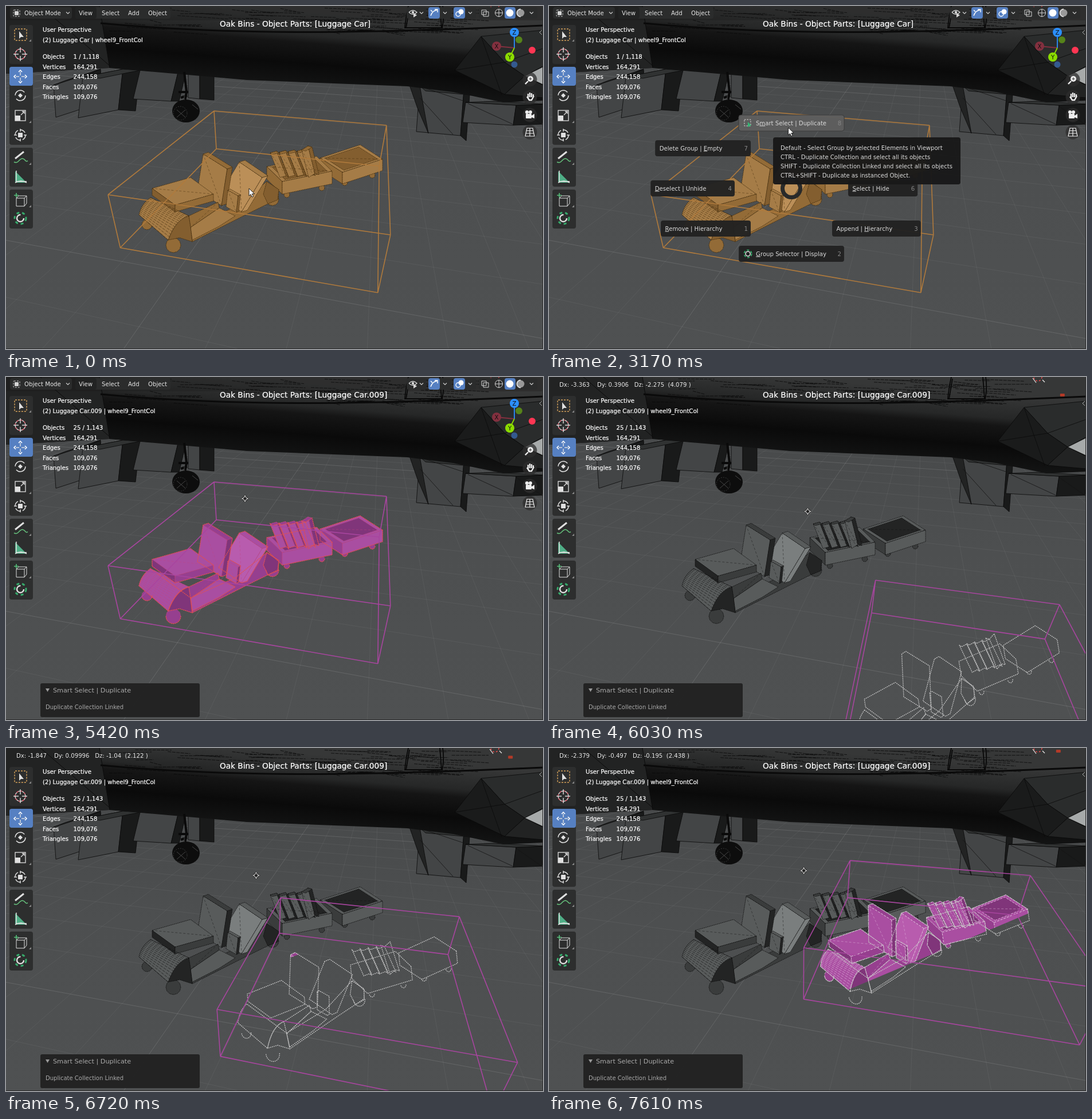
Animation, 937 px wide and 598 px high, one loop 8 s. Source, as an HTML page:

```html
<!DOCTYPE html>
<html lang="en">
<head>
<meta charset="utf-8">
<title>Viewport duplicate</title>
<style>
html, body { margin: 0; width: 100%; height: 100%; overflow: hidden; background: #4d4f50; }
svg { display: block; width: 937px; height: 598px; font: 10.15px "DejaVu Sans", sans-serif; }
text { white-space: pre; }
.overlay { stroke: #fff; stroke-width: .22px; }
.u { text-decoration: underline; }
</style>
</head>
<body>
<svg id="stage" viewBox="0 0 937 598" xmlns="http://www.w3.org/2000/svg"></svg>
<script>
const stage = document.getElementById('stage');
const LOOP = 8000, BLUE = '#5680c2', PINK = '#a8459f', ORANGE = '#b07a3c';

// Markup helpers
const poly = (pts, fill, extra = '') => `<polygon points="${pts}" fill="${fill}" ${extra}/>`;
const path = (d, stroke, width = 1, extra = '') =>
  `<path d="${d}" fill="none" stroke="${stroke}" stroke-width="${width}" ${extra}/>`;
const rect = (x, y, w, h, fill, r = 4, extra = '') =>
  `<rect x="${x}" y="${y}" width="${w}" height="${h}" rx="${r}" fill="${fill}" ${extra}/>`;
const disc = (x, y, r, fill, extra = '') => `<circle cx="${x}" cy="${y}" r="${r}" fill="${fill}" ${extra}/>`;
const ring = (x, y, r, stroke, width = 1.4, dash = 'none') =>
  disc(x, y, r, 'none', `stroke="${stroke}" stroke-width="${width}" stroke-dasharray="${dash}"`);
const text = (x, y, s, fill = '#e6e6e6', extra = '') => `<text x="${x}" y="${y}" fill="${fill}" ${extra}>${s}</text>`;
const overlay = (x, y, s, extra = '') => text(x, y, s, '#fff', `class="overlay" ${extra}`);
const group = (id, body, extra = '') => `<g id="${id}" ${extra}>${body}</g>`;
const chevron = x => path(`M${x - 3} 10.5l3 3l3-3`, '#ccc', 1.2);

// Geometry helpers
const fmt = p => p.map(v => v.toFixed(1)).join();
const line = (a, b) => `M${fmt(a)}L${fmt(b)}`;
const points = s => s.split(' ').map(p => p.split(',').map(Number));
const trace = (pts, move) => pts.map(p => fmt(move(p))).join(' ');
const sum = (...vs) => vs.reduce((a, b) => a.map((v, i) => v + b[i]));
const mix = (a, b, k) => a + (b - a) * k;
const mixPoint = (a, b, k) => a.map((v, i) => mix(v, b[i], k));
const clamp = k => Math.max(0, Math.min(1, k));
const still = p => p;

// Projective frame of the bounding box: homogeneous corner, its three edges, edge lengths in metres
const ORIGIN = [363, 183, 1];
const EDGES = [[239, 5.6, -.0933], [-254.1, 18.3, -.3881], [24, 79.6, .0546]];
const METRES = [-4.37, 3.85, -1.09];
const combine = k => EDGES[0].map((_, i) => k.reduce((s, v, n) => s + v * EDGES[n][i], 0));
const shiftFor = delta => combine(delta.map((v, i) => v / METRES[i]));
const space = (k, shift = [0, 0, 0]) => sum(ORIGIN, shift, combine(k));
const project = (k, shift) => { const [x, y, w] = space(k, shift); return [x / w, y / w]; };

function boxPath(shift) {
  const corner = n => project([n & 1, n >> 1 & 1, n >> 2 & 1], shift);
  let d = '';
  for (let i = 0; i < 8; i++) for (const bit of [1, 2, 4]) if (!(i & bit)) d += line(corner(i), corner(i | bit));
  return d;
}

function floorGrid() {
  let out = '';
  for (let k = -22; k < 22; k++) {
    const x = .285 + k * .229, y = 1.07 - k * .25;
    const endX = Math.min(6, (space([0, y, 1])[2] - .06) / .0933), endY = (space([x, 0, 1])[2] - .06) / .3881;
    const opacity = k % 10 ? .055 : .12;
    if (k > -5) out += path(line(project([-6, y, 1]), project([endX, y, 1])), '#fff', 1, `opacity="${opacity}"`);
    out += path(line(project([x, -5, 1]), project([x, endY, 1])), '#fff', 1, `opacity="${opacity}"`);
  }
  return out;
}

// Car parts: each has toned faces and a rim. A slab shows the three faces that meet at p.
function slab(p, u, v, w, tones) {
  const face = (a, b) => [p, sum(p, a), sum(p, a, b), sum(p, b)];
  return {
    faces: [face(u, v), face(v, w), face(u, w)].map((f, i) => [tones[i], f]),
    rim: [sum(p, u), sum(p, u, v), sum(p, v), sum(p, v, w), sum(p, w), sum(p, w, u)]
  };
}
function tray(p, u, v, w) {
  const part = slab(p, u, v, w, [1, 2, 1]), lid = part.faces[0][1];
  const centre = mixPoint(lid[0], lid[2], .5);
  part.faces.push([3, lid.map(q => mixPoint(centre, q, .84))]);
  return part;
}
const plate = (tone, s) => ({ faces: [[tone, points(s)]], rim: points(s) });
const curve = (a, b, c) => t => mixPoint(mixPoint(a, b, t), mixPoint(b, c, t), t);
const steps = (n, f) => Array.from({ length: n + 1 }, (_, i) => f(i / n));

const hoodLeft = curve([252, 334], [236, 345], [232, 364]);
const hoodRight = curve([319, 366], [296, 372], [283, 408]);
const hood = [...steps(8, hoodLeft), ...steps(8, hoodRight).reverse()];
const flank = [...steps(8, hoodRight), [303, 404], [325, 411], [322, 385]];
const bag = i => slab([472 + 15.5 * i, 253 - i], [-11, 3], [17, 43], [4, 3], [1, 3, 2]);
const CAR = [
  tray([587, 290], [70, -23], [-39, -25], [0, 20]),
  tray([482, 306], [87, -18], [-27, -26], [0, 22]),
  ...[0, 1, 2, 3].map(bag),
  slab([527, 244], [-11, 7], [12, 48], [7, 2], [1, 3, 2]),
  plate(2, '322,385 400,350 455,306 476,320 475,336 420,363 325,411'),
  plate(3, '455,306 476,320 474,338 457,345 449,328'),
  slab([447, 299], [-40, -27], [-36, 60], [10, -3], [0, 0, 1]),
  slab([386, 284], [-42, -26], [-10, 64], [9, -3], [1, 3, 2]),
  slab([405, 331], [-18, -10], [-3, 29], [4, -2], [1, 3, 1]),
  plate(1, '322,386 372,352 400,366 372,384 325,408'),
  plate(2, '319,366 370,342 372,352 322,386'),
  { faces: [[3, flank], [1, hood]], rim: [...hood, ...flank] },
  slab([295, 347], [67, -19], [-40, -29], [0, 12], [1, 3, 2])
];
const WHEELS = [[292, 417, 13], [246, 381, 9], [465, 337, 11], [490, 329, 5], [551, 317, 5], [591, 308, 5], [639, 295, 5]];
const arc = ([x, y, r], turn) => steps(12, t => [x + r * Math.cos(t * turn), y + r * Math.sin(t * turn)]);

// Moves a car point as if it lay in the upright plane along the car
const nearness = (x, y) => 1.307 - .00066 * x + .00091 * y;
const mover = shift => ([x, y]) => {
  const w = 1 / nearness(x, y);
  return [(x * w + shift[0]) / (w + shift[2]), (y * w + shift[1]) / (w + shift[2])];
};

function carFaces(move, tones, ink, dash = '2 1') {
  const edge = `stroke="${ink}" stroke-width=".8" stroke-dasharray="${dash}"`;
  const face = ([tone, pts]) => poly(trace(pts, move), tones[tone], edge);
  const creases = CAR.map(({ faces: [[, f]] }) => f.length === 4 ? line(move(f[1]), move(f[3])) : '').join('');
  const ribs = steps(13, t => line(move(hoodLeft(t)), move(hoodRight(t)))).join('');
  return WHEELS.map(w => face([2, arc(w, 2 * Math.PI)])).join('') +
    CAR.flatMap(part => part.faces).map(face).join('') +
    path(ribs, ink, .8, 'stroke-dasharray="5 2" opacity=".75"') +
    path(creases, ink, .6, 'stroke-dasharray="4 3" opacity=".7"');
}
function carOutline(move, stroke, width = 1.3) {
  const rims = CAR.map(p => 'M' + trace(p.rim, move) + 'Z').join('');
  const tyres = WHEELS.map(w => 'M' + trace(arc(w, Math.PI), move)).join('');
  return path(rims + tyres, stroke, width, 'stroke-dasharray="2 1.2"');
}
const PINKS = ['#b85cae', '#a94ea1', '#963f8f', '#80357a'];

function aircraft() {
  const edge = 'stroke="#0a0a0a" stroke-width=".8"';
  const tones = ['#434546', '#191a1a', '#303232'];
  const block = (...a) => slab(...a, [0, 1, 2]).faces.map(([tone, f]) => poly(trace(f, still), tones[tone], edge)).join('');
  let seed = 7, wires = '';
  const rnd = () => (seed = seed * 16807 % 2147483647) / 2147483647;
  for (let i = 0; i < 90; i++)
    wires += line([180 + rnd() * 600, 3 + rnd() * 44], [0, 0]).split('L')[0] + `l${fmt([20 + rnd() * 70, rnd() * 7 - 1])}`;
  return block([145, 118], [-62, 20], [4, 56], [20, -8]) + block([204, 110], [-70, 14], [-8, 71], [30, 2]) +
    block([300, 116], [-66, -4], [-12, 50], [14, 0]) + block([338, 116], [-20, -2], [0, 46], [25, 2]) +
    block([799, 146], [-77, -7], [-6, 80], [10, 9]) + block([890, 173], [-88, -5], [-5, 35], [50, -2]) +
    poly('704,138 722,139 737,222 718,178', '#222323', edge) +
    path('M722 160L780 224M722 140L800 166M806 170L884 206M890 175L936 207', '#151515', .8) +
    poly('0,0 937,0 937,165 868,168 780,150 700,140 420,129 180,108 0,118', 'url(#hull)') +
    poly('0,0 163,0 181,108 0,118', '#222323') + path('M163 0L181 108M60 0L182 105', '#0b0b0b') +
    path(wires, '#090909', .8, 'stroke-dasharray="6 1.5"') + path('M165 30C400 52 620 48 937 34', '#0a0a0a', 3) +
    poly('829,53 937,42 937,105 905,122 870,98', '#2a2c2c', edge) +
    poly('829,53 870,98 905,122 870,154 783,112', '#1a1b1b', edge) +
    poly('870,154 905,122 937,138 937,160', '#222323', edge) + poly('905,122 937,106 937,137', '#a7aaaa', edge) +
    path('M829 53L865 155M783 112L870 98L937 74', '#0b0b0b', .8) +
    path('M702 0Q697 22 696 38H761Q765 22 762 0M704 3L698 38M757 0L760 38', '#090909', 1.8) +
    path('M311 115L315 150L310 176M301 150H318M305 160L316 156', '#0a0a0a', 4) +
    `<ellipse cx="314" cy="183" rx="24" ry="20" fill="#0d0d0d"/>` + ring(304, 187, 12, '#3c3d3d', 1, '2 2') +
    path('M298 181L313 194M313 181L298 194M311 152V164M325 172L335 180', '#555', .8);
}

function toolbar() {
  const W = '#e0e0e0', tab = (y, h) => rect(6, y, 41, h, '#2d2e2e');
  const spokes = (y, a, b) => [0, 90, 180, 270].map(r => path(`M0 ${-a}V${-b}`, W, 1.4, `transform="translate(25 ${y}) rotate(${r})"`)).join('');
  const tips = (y, a) => [0, 90, 180, 270].map(r => path(`M-3 ${3 - a}l3-3l3 3`, '#fff', 1.6, `transform="translate(25 ${y}) rotate(${r})"`)).join('');
  return tab(33, 68) + tab(106, 136) + tab(247, 68) + tab(320, 68) + rect(6, 106, 41, 33, BLUE) +
    rect(15, 40, 21, 20, 'none', 1, 'stroke="#d9a45b" stroke-width="1.4" stroke-dasharray="3 2"') + poly('23,44 23,57 26,54 31,54', W) +
    ring(25, 84, 9, W) + ring(25, 84, 9, '#d0485a', 1.5, '3.5 3.5') + spokes(84, 12, 3) +
    spokes(123, 8, 2) + tips(123, 11) + ring(25, 156, 9, W, 1.6, '22 6.3') + poly('25,152 29,156 25,160 21,156', W) +
    rect(16, 182, 18, 18, 'none', 0, `stroke="${W}" stroke-width="1.3"`) + rect(16, 191, 9, 9, W, 0) + path('M26 190l6-6M28 184h4v4', W, 1.3) +
    ring(25, 225, 9, W, 1.5, '10 4') + rect(21, 221, 8, 8, W, 1) + spokes(225, 11, 6) +
    path('M14 272c8 4 9-7 15-6s4 7 9 4', '#66c17c', 1.5) + path('M16 266L31 254', W, 3) +
    poly('16,288 16,308 36,308', '#4fae86') + path('M16 308A20 20 0 0 1 36 308M18 287V306H36', W, 1.5) +
    path('M18 335h14v14h-14zM18 335l4-4h14l-4 4M36 331v13l-4 5', W) + path('M14 330h8M18 326v8', '#58c27c', 1.6) +
    ring(25, 370, 10, '#36aa6b', 3, '5 5') + ring(25, 370, 6, W, 2.4, '28 9') +
    [62, 204, 277, 351].map(y => poly(`44,${y - 4} 44,${y} 40,${y}`, '#888')).join('');
}

function header() {
  const I = '#d5d5d5', pill = (x, w, fill = '#2b2c2c') => rect(x, 2, w, 20, fill);
  const axis = (x, y, col, name) => path(`M887 73L${x} ${y}`, col, 1.8) + disc(x, y, 8, col) +
    text(x, y + 3.5, name, '#111', 'text-anchor="middle"');
  return rect(0, 0, 937, 25, 'rgba(20,20,20,.25)', 0) + pill(7, 108) + pill(121, 166) + pill(121, 37, '#222323') +
    rect(13, 7, 11, 11, 'none', 1, `stroke="${I}" stroke-dasharray="3 2"`) + rect(15, 9, 7, 7, I, 1) + text(32, 16, 'Object Mode') +
    text(127, 16, 'View') + text(167, 16, 'Select') + text(213, 16, 'Add') + text(248, 16, 'Object') +
    pill(699, 34) + pill(737, 39) + pill(737, 20, BLUE) + pill(781, 39) + pill(781, 20, BLUE) + pill(825, 102) + pill(870, 19, BLUE) +
    path('M703 11q7-7 14 0q-7 7-14 0', I, 1.3) + disc(710, 11, 2.2, I) + poly('711,12 711,20 717,16', I) +
    path('M741 17q3-9 11-10M748 6h5v5M741 7l3 3', '#fff', 1.4) + disc(794, 10, 4.5, '#fff') + ring(789, 14, 4, '#fff') +
    path('M830 7h8v8h-8zM833 10h9v8h-9z', I) + ring(860, 12, 6.5, I, 1) + path('M853.5 12h13M860 5.5v13', I) +
    disc(879, 12, 6.5, '#fff') + disc(898, 12, 6.5, '#999') + path('M898 5.5a6.5 6.5 0 0 0 0 13', I, 2) +
    [108, 725, 766, 810, 917].map(chevron).join('') +
    disc(895, 59, 6, '#56831a') + disc(918, 77, 6, '#ff3653') + disc(887, 102, 5.5, '#345a8f') +
    axis(856, 70, '#83303f', 'X') + axis(887, 46, '#2b8fff', 'Z') + axis(879, 89, '#8bdc00', 'Y') +
    [128, 159, 190, 220].map(y => disc(914, y, 12.5, 'rgba(45,46,46,.75)')).join('') +
    disc(915, 127, 5, '#eee') + path('M911 131l-5 5', '#eee', 2.4) + path('M912.5 127h5M915 124.5v5', '#333') +
    path('M909 158l4 6h4l4-7M911 160v-7M914 159v-8M917 159v-7M920 159v-5', '#eee', 2.3) +
    rect(907, 188, 10, 8, '#eee', 1) + poly('917,191 922,188 922,196 917,194', '#eee') + disc(909, 185, 3, '#eee') + disc(915, 185, 3, '#eee') +
    path('M909 213h10l3 14h-16zM914 213v14M908 217.5h12M907 222h14', '#eee', 1.2);
}

// Pie labels by number key; "_" marks the shortcut letter. The key pad gives each place.
const PIE = { 1: '_Remove | Hierarchy', 2: '_Group Selector | Display', 3: 'Append | _Hierarchy', 4: '_Deselect | Unhide',
  6: '_Select | Hide', 7: 'Delete Group | _Empty', 8: 'S_mart Select | Duplicate', 9: '_Add New Group | Link' };
const PIE_ART = {
  8: rect(10, 8, 11, 11, 'none', 0, 'stroke="#ddd" stroke-dasharray="2.5 2"') + poly('16,12 16,21 22,18', '#36b574'),
  2: ring(16, 14, 6.5, '#36aa6b', 2, '4 3') + ring(16, 14, 4, '#ddd', 1.6)
};
const pieItem = key => group('pie' + key, rect(0, 0, 0, 28, '#222', 4, 'fill-opacity=".96"') + (PIE_ART[key] || '') +
  text(PIE_ART[key] ? 30 : 7.5, 17.5, PIE[key].replace(/_(.)/, '<tspan class="u">$1</tspan>'), '#dcdcdc') +
  text(0, 17.5, key, '#888', 'text-anchor="end"'));

const TIP = ['Default - Select Group by selected Elements in Viewport', 'CTRL - Duplicate Collection and select all its objects',
  'SHIFT - Duplicate Collection Linked and select all its objects', 'CTRL+SHIFT - Duplicate as instanced Object.'];
const STATS = { Objects: '', Vertices: '164,291', Edges: '244,158', Faces: '109,076', Triangles: '109,076' };

stage.innerHTML = `<defs>
  <linearGradient id="floor" x2="0" y2="1"><stop stop-color="#454748"/><stop offset=".5" stop-color="#4d4f50"/><stop offset="1" stop-color="#4f5152"/></linearGradient>
  <linearGradient id="hull" gradientUnits="userSpaceOnUse" x1="400" y1="0" x2="388" y2="150"><stop stop-color="#363737"/><stop offset=".27" stop-color="#262727"/><stop offset=".36" stop-color="#151515"/><stop offset=".6" stop-color="#0a0a0a"/><stop offset="1" stop-color="#181919"/></linearGradient>
  <clipPath id="above"><polygon id="cut"/></clipPath></defs>` +
  rect(0, 0, 937, 598, 'url(#floor)', 0) + floorGrid() + aircraft() +
  group('orangeCar', carFaces(still, ['#bb8f58', '#a57c47', '#936b37', '#835e2f'], '#3d2809')) +
  group('pinkCar', carFaces(still, PINKS, '#c04580') + carOutline(still, '#e3504e')) +
  group('greyCar', carFaces(still, ['#7a7e7e', '#585b5b', '#3a3c3c', '#232424'], '#0c0c0c')) +
  group('ghostFill', '', 'clip-path="url(#above)"') + group('ghostLine', '') +
  path('', ORANGE, 1.6, 'id="box"') + group('dot', rect(-4, -2.5, 8, 5, '#b33a28', 1)) +
  ring(853, 0, 7, '#e04a4a', 1.5, '3 3') + path('M844 2l6 8M861 5l4 4', '#eee', 1.2) +
  group('headerBar', header()) + text(18, 16.5, '', '#e6e6e6', 'id="delta"') + toolbar() +
  overlay(373, 36, '', 'id="title" font-size="13.66"') + path('M935 42l-4 4l4 4', '#aaa') +
  overlay(64, 45, 'User Perspective') + overlay(64, 63, '', 'id="active"') +
  Object.entries(STATS).map(([name, count], i) =>
    overlay(64, 92 + i * 17.5, name) + overlay(117.5, 92 + i * 17.5, count, `id="${name}"`)).join('') +
  group('panel', rect(60, 534, 278, 59, 'rgba(32,32,32,.94)', 3) + poly('69,543 76,543 72.5,549', '#999') +
    text(82, 550, 'Smart Select | Duplicate', '#aaa', 'font-size="11.2"') + text(69, 579, 'Duplicate Collection Linked', '#aaa', 'font-size="10"')) +
  group('menu', Object.keys(PIE).map(pieItem).join('') + text(423, 291, 'Oak Bins', '#ccc', 'text-anchor="middle" opacity=".45"') +
    ring(423, 318, 15.5, '#292a2a', 7) + path('M416.5 304A15.5 15.5 0 0 1 429.5 304', BLUE, 6.5, 'id="arc"')) +
  group('tip', rect(391, 229, 327, 82, 'rgba(25,25,25,.97)') + TIP.map((s, i) => text(404, 250.5 + i * 16, s, '#dcdcdc', 'font-size="10.05"')).join('')) +
  group('arrow', poly('0,0 0,13 3,10.3 5.2,15 7.5,14 5.3,9.5 9.5,9.5', '#fff', 'stroke="#111" stroke-width=".9"')) +
  group('moveCursor', [0, 90, 180, 270].map(a => poly('-2.6,-3.6 0,-6.4 2.6,-3.6', '#fff', `stroke="#111" stroke-width=".9" transform="rotate(${a})"`)).join('') +
    disc(0, 0, 3.2, '#222', 'stroke="#ddd"')) +
  path('M936.5 0V597.5H0', '#2a2a2a');

const $ = Object.fromEntries([...stage.querySelectorAll('[id]')].map(e => [e.id, e]));
const show = (id, on) => { $[id].style.display = on ? '' : 'none'; };
const put = (id, x, y) => $[id].setAttribute('transform', `translate(${x.toFixed(1)} ${y.toFixed(1)})`);

// Sizes each pie button to its label and keeps where it opens to
const pieSpots = Object.keys(PIE).map(key => {
  const [back, ...rest] = $['pie' + key].children, number = rest.pop(), label = rest.pop();
  const width = label.getComputedTextLength() + (PIE_ART[key] ? 61 : 57);
  const col = (key - 1) % 3 - 1, row = 1 - Math.floor((key - 1) / 3), reach = row ? 71 : 99;
  back.setAttribute('width', width);
  number.setAttribute('x', width - 5);
  return { id: 'pie' + key, x: col * reach + (col - 1) * width / 2, y: row * (col ? 70 : 114), width };
});

// Drag keys: step, then the move in metres
const DRAG = [[0, 0, 0, 0], [7, -3.363, .3906, -2.275], [17, -1.847, .09996, -1.04], [30, -2.379, -.497, -.195]];
function dragAt(t) {
  const clock = t < 7330 ? Math.min(t, 7200) : t;
  const step = Math.min(30, Math.floor((clock - 5620) / 68.2) + 1);
  const i = DRAG.findIndex(k => k[0] >= step), a = DRAG[i - 1], b = DRAG[i];
  return mixPoint(a, b, (step - a[0]) / (b[0] - a[0])).slice(1);
}

function drawGhost(shift, depth) {
  const move = mover(shift);
  const cut = x => { const y = 430 - (x - 291) * .365; return [x, y - depth * 98 * nearness(x, y)]; };
  $.cut.setAttribute('points', trace([...steps(4, k => cut(mix(200, 690, k))), [690, 200], [200, 200]], move));
  $.ghostFill.innerHTML = carFaces(move, PINKS, '#e8c6e4', '4 2');
  $.ghostLine.innerHTML = carOutline(move, '#c4c4c4');
}

// Progress that holds for each of n steps
const stepped = (t, from, to, n) => t < from ? 0 : clamp((Math.floor((t - from) * (n - 1) / (to - from)) + 1) / n);

let lastKey = '';
function draw(t) {
  const menu = t >= 500 && t < 3700, copied = t >= 3770, moving = t >= 5620;
  const k = stepped(t, 1030, 1640, 9), ease = k * k * (3 - 2 * k);
  const nudge = stepped(t, 1910, 1980, 2), lift = stepped(t, 2830, 3170, 5), aimed = ease > .25;
  const visible = { menu, arc: aimed, tip: t >= 2440 && t < 3700, orangeCar: !copied, pinkCar: copied && !moving,
    greyCar: moving, panel: copied, headerBar: !moving, delta: moving, dot: moving, ghostFill: moving, ghostLine: moving,
    arrow: t < 5420, moveCursor: t >= 5420 };
  for (const id in visible) show(id, visible[id]);

  const open = .5 + .5 * stepped(t, 500, 570, 2);
  for (const { id, x, y, width } of pieSpots)
    put(id, 423 - width / 2 + (x + width / 2) * open, 304 + y * open);
  $.pie8.firstChild.setAttribute('fill', aimed ? '#5e5e5e' : '#222');
  $.pie8.firstChild.setAttribute('stroke', aimed ? '#3a3a3a' : 'none');
  put('arrow', mix(424, 417.5, ease), mix(318, 219, ease) - 1.5 * nudge - 5.5 * lift);

  const delta = moving ? dragAt(t) : [0, 0, 0], key = [copied, moving, delta].join();
  if (key === lastKey) return;
  lastKey = key;
  const name = copied ? 'Luggage Car.009' : 'Luggage Car';
  $.title.textContent = `Oak Bins - Object Parts: [${name}]`;
  $.active.textContent = `(2) ${name} | wheel9_FrontCol`;
  $.Objects.textContent = copied ? '25 / 1,143' : '1 / 1,118';

  const shift = shiftFor(delta);
  $.box.setAttribute('d', boxPath(shift));
  $.box.setAttribute('stroke', copied ? PINK : ORANGE);
  put('moveCursor', 417 + shift[0] * .165, 212 + shift[1] * .13);
  put('dot', 860 + shift[0] * .172, 3 + shift[1] * .165);
  if (!moving) return;
  const [x, y, z, length] = [...delta, Math.hypot(...delta)].map(v => Number(v.toPrecision(4)));
  $.delta.textContent = `Dx: ${x}    Dy: ${y}   Dz: ${z}  (${length} )`;
  drawGhost(shift, -delta[2]);
}

const start = performance.now();
function tick() {
  draw((performance.now() - start) % LOOP);
  requestAnimationFrame(tick);
}
tick();
</script>
</body>
</html>
```
